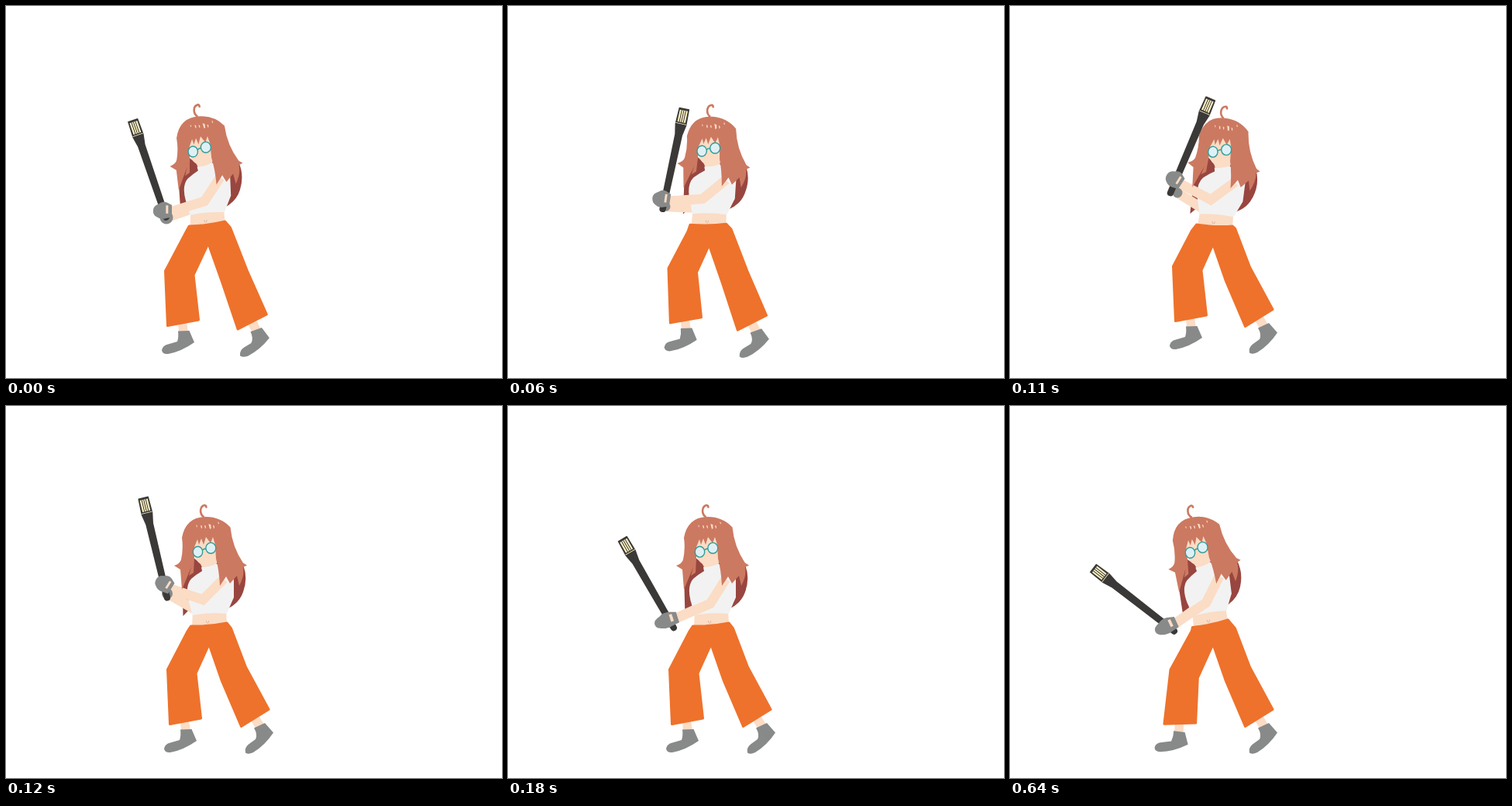
Recreate the animation shown at these times as an HTML page. Size 640 by 480 pixels, loop 0.93 s.

```html
<!DOCTYPE html>
<html lang="en">
<head>
<meta charset="utf-8">
<title>Swing</title>
<style>
  html, body { margin: 0; width: 100%; height: 100%; overflow: hidden; background: #fff; }
  svg { display: block; width: 100vw; height: 100vh; }
  .hair { fill: #cc7961; }
  .shade { fill: #98463f; }
  .skin { fill: #fbdcc5; }
  .top { fill: #f2f2f2; }
  .grey { fill: #888a89; }
  .dark { fill: #3a3938; }
  .cream { fill: #fff4c2; }
  .arm { fill: none; stroke: #fbdcc5; stroke-width: 12.5; stroke-linejoin: miter; }
  .pants { fill: #ee722c; stroke: #ee722c; stroke-width: 3; stroke-linejoin: round; }
  .lens { fill: #dff0f5; stroke: #2f9c98; stroke-width: 1.4; }
</style>
</head>
<body>
<svg viewBox="0 0 640 480">
  <g class="body">
    <path class="shade" d="M240 194 L252 204 L292 200 L306 205 Q312.500 222 306 240 Q301 254 287 261 L255 240 L237 262 L228.500 271 L227 215Z"/>
  </g>
  <path class="arm" id="backArm"/>

  <g class="body">
    <path class="skin" d="M241 264 L284 264 L285 282 Q262 287 240 285Z"/>
    <path class="top" d="M252 208 L271 203 L280 210 L294 222 L294 247 Q289 258 285 268 Q262 266 240 270 Q239 262 235.500 251 Q231 232 239 223 Q246 217 253 213Z"/>
    <path d="M258.500 277 V279 Q260 281.500 261.500 279 V277" fill="none" stroke="#d5b5a6" stroke-width=".9"/>
  </g>

  <g id="leftShin">
    <path class="skin" d="M225 406 L236 406 L238 419 L226 419Z"/>
    <path class="grey" d="M225 417.500 L239.500 417 L246 432 Q229 444 212 447 Q204.500 447.500 204 442 Q205 436 212 434.500 L224 431 Q226 425 225 417.500Z"/>
  </g>
  <g id="rightShin">
    <path class="skin" d="M316 406 L327 401 L333 411 L322 416Z"/>
    <path class="grey" d="M320 415.500 L334 409 L345 421.500 Q334 438 319 447 Q312 450 309 447.500 Q307.500 441 313 436.500 L322 430 Q325 424 320 415.500Z"/>
  </g>
  <path class="pants" id="pants"/>

  <path class="arm" id="frontArm"/>

  <g class="body">
    <path class="skin" d="M242 165 L272 165 L272 203 Q263 208 253 208 L251 204 Q243 198 242 188Z"/>
    <path class="hair" d="M227 170 Q232 143 258 143 Q277 143 289.500 156.500 Q292 182 306 202.500 L311 205.500 L306 208 Q308 219 301 232 L298 219 L289 229 L284 220 L276 232 Q275 212 271 197 L270 179 L267 169 L264 177 L258 169 L255 179 L252 171 L249 179 L247 172 L243 182 L243 197 L242 215 L236 219 L239 208 L227 237 L225 211 L217 206 Q225 203 226 198 Q229 184 227 170Z"/>
    <path d="M255.500 143.500 C249 139 250 129 256.500 128 Q259 128.500 258 131.500" fill="none" stroke="#cc7961" stroke-width="2.600"/>
    <g class="skin" id="shine"></g>
    <ellipse class="lens" cx="247.500" cy="188.200" rx="6.200" ry="6.900"/>
    <ellipse class="lens" cx="264.300" cy="183.300" rx="6.500" ry="6.900"/>
    <path d="M253.500 186 Q256 183.500 258 184.500" fill="none" stroke="#2f9c98" stroke-width="1.400"/>
  </g>

  <circle class="grey" id="palm"/>
  <g id="bat">
    <path class="dark" d="M-6.900 .6 Q-6.900 0 -6.300 0 H6.300 Q6.900 0 6.900 .6 L7.500 21.500 L5 35 L4.200 133 Q4 137 0 137 Q-4 137 -4.200 133 L-5 35 L-7.500 21.500Z"/>
    <path class="cream" d="M-5.200 2.800 H5.200 V18.300 H-5.200Z M-7 20 H7 V20.800 H-7Z"/>
    <path d="M-2.600 2.800 V18.300 M0 2.800 V18.300 M2.600 2.800 V18.300" stroke="#3a3938"/>
  </g>
  <g id="mitt">
    <path class="grey" d="M0 7.500 L9 10.500 Q16 12 22 8.500 Q31 6 31 1 Q31 -4 26 -6 Q18 -10 10 -8 L0 -6.500Z"/>
    <rect class="skin" x="6" y="-2.500" width="3.800" height="9.500"/>
  </g>
</svg>

<script>
const $ = id => document.getElementById(id);
const LOOP = 930;

// body, left shin and right shin: dx, dy, degrees; hip: dx, dy
const rest = { body: [0, 0, 0], hip: [0, 0], left: [0, 0, 0], right: [0, 0, 0] };
const stances = {
  ready: { body: [-5.5, -1, -2.4], hip: [-1, -1], left: [-3, 2, 0], right: [1, 3, 4.5] },
  lift: { body: [1.5, 0, 3.7], hip: [-2.5, 1], left: [-1.5, -1.5, .5], right: [-1.3, 4, 5] },
  wind: { ...rest, body: [12, 2, 7.4], left: [2, -4, 0] },
  swing: rest,
  follow: { ...rest, body: [-13, -1, -7.1], left: [-2, 3, 9] }
};

// mitt: degrees, length; palm: x, y, radius; bat: top x, y, end x, y
const steps = [
  { at: 0, stance: 'ready', elbow: [256, 252], wrist: [214, 265], mitt: [180, .78], palm: [207, 273, 8.5], bat: [163.5, 147, 208, 277] },
  { at: 60, stance: 'lift', elbow: [251, 249], wrist: [209, 251.5], mitt: [188, .74], palm: [204, 259, 5.5], bat: [227.5, 132, 198.5, 267] },
  { at: 90, stance: 'wind', elbow: [259, 250], wrist: [221, 230], mitt: [212, .72], palm: [216, 241, 6.5], bat: [259, 119, 205, 246] },
  { at: 120, stance: 'swing', elbow: [254, 250], wrist: [213, 236], mitt: [212, .74], palm: [208, 242, 7], bat: [177, 118, 209, 252] },
  { at: 150, stance: 'swing', elbow: [262, 256], wrist: [216, 257], mitt: [195, .9], palm: [211, 260, 4.5], bat: [148.5, 150, 217, 269] },
  { at: 180, stance: 'swing', elbow: [261, 255], wrist: [219, 273], mitt: [162, 1], palm: [212, 276, 4.5], bat: [147.5, 171, 216, 290] },
  { at: 210, stance: 'follow', elbow: [253, 254], wrist: [215, 279], mitt: [155, .97], palm: [208, 285, 4.5], bat: [107, 209, 215, 293] }
];

for (const [x, y, size] of [[246, 155, 1], [252, 156, 1.5], [257, 156, 1.4], [263, 155.5, 2.4], [268, 156, 1.4], [274, 151, 1.1]]) {
  $('shine').innerHTML += `<path d="M${x - size * .7} ${y - 1.4 * size} L${x + size * .5} ${y - size} L${x + size * .7} ${y + size} L${x} ${y + 1.4 * size}Z"/>`;
}

const pivot = ([dx, dy, turn], cx, cy) =>
  new DOMMatrix().translate(cx + dx, cy + dy).rotate(turn).translate(-cx, -cy);

const at = (matrix, x, y) => {
  const p = matrix.transformPoint(new DOMPoint(x, y));
  return `${p.x} ${p.y}`;
};

const move = (el, matrix) => el.setAttribute('transform', matrix.toString());

function pose(step) {
  const s = stances[step.stance];
  const body = pivot(s.body, 264, 205.5);
  const hip = new DOMMatrix().translate(...s.hip);
  const left = pivot(s.left, 227, 342);
  const right = pivot(s.right, 294, 346);

  document.querySelectorAll('.body').forEach(el => move(el, body));
  move($('leftShin'), left);
  move($('rightShin'), right);

  const outline = [
    [body, 285, 280], [hip, 290.5, 287], [right, 309.5, 337], [right, 339, 391.5],
    [right, 303.5, 413.5], [right, 278.5, 355], [hip, 262, 307.5], [left, 245, 345],
    [left, 251.5, 403], [left, 211.5, 410.5], [left, 208.5, 340], [hip, 234.5, 290]
  ].map(p => at(...p));
  $('pants').setAttribute('d',
    `M${at(body, 238.5, 284)} Q${at(body, 263, 284.5)} ${outline.join(' L')}Z`);

  const [px, py, radius] = step.palm;
  $('backArm').setAttribute('d', `M${px} ${py} L${at(body, 243, 262)}`);
  $('frontArm').setAttribute('d', `M${at(body, 281, 223)} L${step.elbow} L${step.wrist}`);

  $('palm').setAttribute('cx', px);
  $('palm').setAttribute('cy', py);
  $('palm').setAttribute('r', radius);

  const [x, y, endX, endY] = step.bat;
  const lean = Math.atan2(endY - y, endX - x) * 180 / Math.PI - 90;
  move($('bat'), new DOMMatrix().translate(x, y).rotate(lean));

  // a foreshortened mitt gets rounder
  const [turn, length] = step.mitt;
  move($('mitt'), new DOMMatrix().translate(...step.wrist).rotate(turn).scale(length, 1.5 - length / 2));
}

const start = performance.now();
let shown;

function tick() {
  const time = (performance.now() - start) % LOOP;
  const step = steps.findLast(s => s.at <= time);
  if (step !== shown) pose(shown = step);
  requestAnimationFrame(tick);
}
tick();
</script>
</body>
</html>
```
